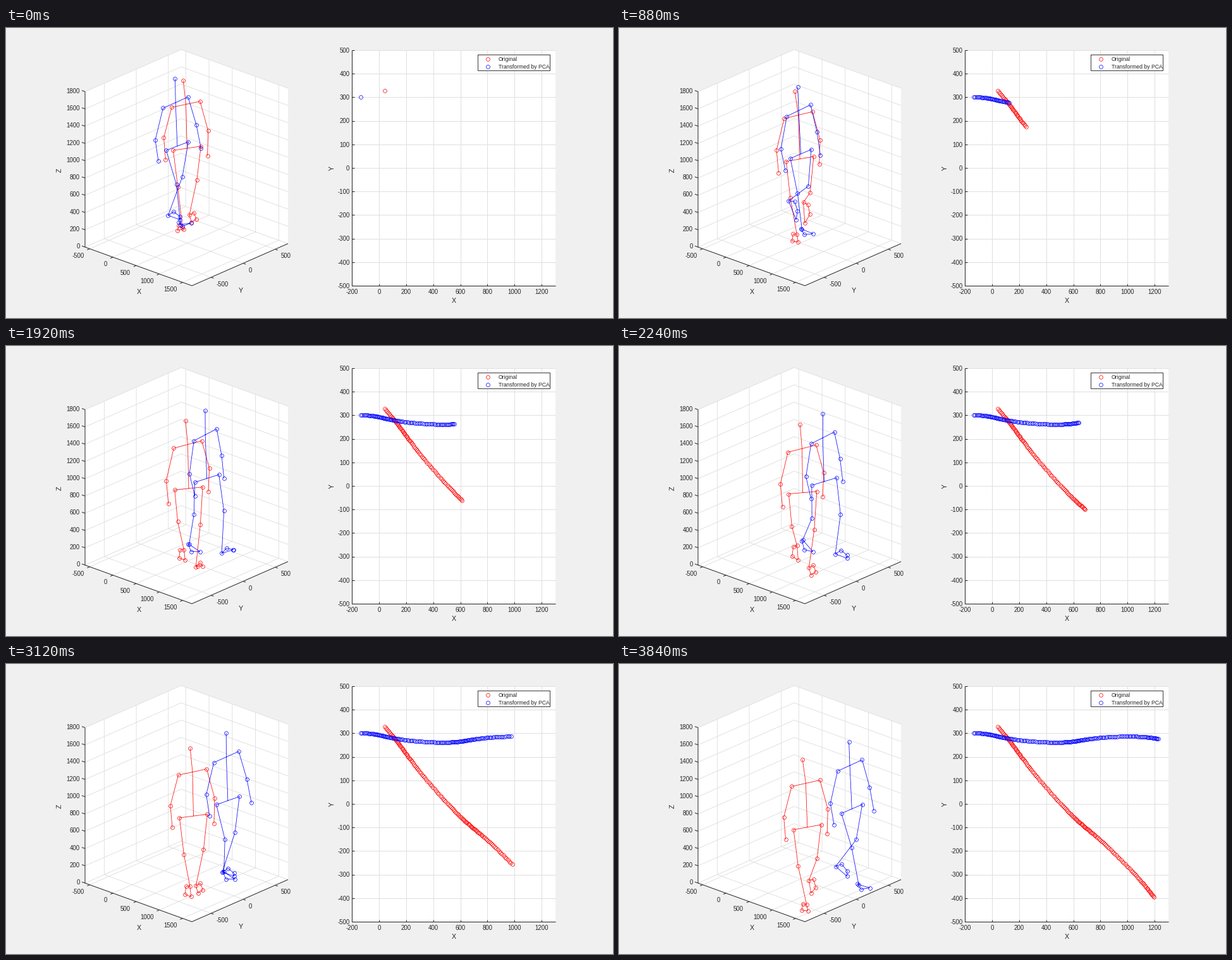
Recreate the animation shown at these times as a matplotlib script. Size 960 by 458 pixels, loop 3.92 s.

```python
import numpy as np
import matplotlib.pyplot as plt
from matplotlib.animation import FuncAnimation

W, H, DPI = 960, 458, 100
FRAMES, STEP = 49, 80
PT = 72 / DPI  # points per pixel
INK, GRID = "#262626", "#dfdfdf"
RED, BLUE = "#ff0000", "#0000ff"
RING = dict(ls="", marker="o", mfc="none", ms=5.8 * PT, mew=0.72 * PT,
            snap=False)

plt.rcParams["font.family"] = "Liberation Sans"
fig = plt.figure(figsize=(W / DPI, H / DPI), dpi=DPI, facecolor="#f0f0f0")
ax = fig.add_axes([0, 0, 1, 1])
ax.set_xlim(0, W)
ax.set_ylim(H, 0)
ax.axis("off")


def line(pts, color=INK, width=1, z=2):
    x, y = zip(*pts)
    ax.plot(x, y, color=color, lw=width * PT, zorder=z,
            solid_capstyle="butt")


def label(x, y, text, size=9.7, ha="center", **kw):
    ax.text(x, y, text, fontsize=size * PT, color=INK, ha=ha,
            va="center", **kw)


def face(pts, z=0):
    ax.fill(*zip(*pts), color="white", lw=0, zorder=z)


# Orthographic view of the 3D box
XLO, XHI, YLO, YHI, ZHI = -600, 1700, -800, 700, 1800
UX = np.array([169, 61]) / (XHI - XLO)
UY = np.array([152, -66.5]) / (YHI - YLO)
UZ = np.array([0, -245.5]) / ZHI
ORIGIN = np.array([125, 346]) - XLO * UX - YLO * UY


def project(p):
    return ORIGIN + np.asarray(p, float) @ np.array([UX, UY, UZ])


def draw_box():
    def path(*pts):
        return [project(p) for p in pts]

    face(path((XLO, YLO, 0), (XHI, YLO, 0), (XHI, YHI, 0), (XLO, YHI, 0)))
    face(path((XLO, YLO, 0), (XLO, YHI, 0), (XLO, YHI, ZHI), (XLO, YLO, ZHI)))
    face(path((XLO, YHI, 0), (XHI, YHI, 0), (XHI, YHI, ZHI), (XLO, YHI, ZHI)))

    for x in range(-500, 1501, 500):
        line(path((x, YLO, 0), (x, YHI, 0), (x, YHI, ZHI)), GRID, 0.9, 1)
        px, py = project((x, YLO, 0))
        line([(px, py), (px - 4, py + 1.7)])
        label(px - 8.7, py + 11.5, f"{x}", ha="right")
    for y in (-500, 0, 500):
        line(path((XHI, y, 0), (XLO, y, 0), (XLO, y, ZHI)), GRID, 0.9, 1)
        px, py = project((XHI, y, 0))
        line([(px, py), (px + 4, py + 1.5)])
        label(px + 8.5, py + 11, f"{y}", ha="left")
    for z in range(0, ZHI + 1, 200):
        line(path((XLO, YLO, z), (XLO, YHI, z), (XHI, YHI, z)), GRID, 0.9, 1)
        px, py = project((XLO, YLO, z))
        line([(px, py), (px - 5, py - 1.8)])
        label(px - 8.2, py - 0.8, f"{z}", ha="right")

    line(path((XLO, YLO, ZHI), (XLO, YLO, 0), (XHI, YLO, 0), (XHI, YHI, 0)))
    label(210, 417.5, "X", 10.8)
    label(371.5, 415.5, "Y", 10.8)
    label(85, 225, "Z", 10.8, rotation=90)


def plan(x, y):
    """Position in the flat X-Y plot."""
    return 590 + 0.2143 * x, 221 - 0.372 * y


def draw_plan():
    left, top = plan(-200, 500)
    right, bottom = 868.5, plan(0, -500)[1]
    face([(left, top), (right, top), (right, bottom), (left, bottom)])
    for x in range(-200, 1201, 200):
        px = plan(x, 0)[0]
        line([(px, top), (px, bottom)], GRID, 1, 1)
        line([(px, bottom), (px, bottom - 3.5)])
        label(px, 417.5, f"{x}")
    for y in range(-500, 501, 100):
        py = plan(0, y)[1]
        line([(left, py), (right, py)], GRID, 1, 1)
        line([(left, py), (left + 3.5, py)])
        label(543.5, py + 0.7, f"{y}", ha="right")
    line([(left, top), (left, bottom), (right, bottom)])
    label(708, 431.5, "X", 10.8)
    label(516, 221, "Y", 10.8, rotation=90)


def draw_legend():
    box = [(746, 42), (860, 42), (860, 67), (746, 67), (746, 42)]
    face(box, z=6)
    line(box, width=0.9, z=7)
    for y, color, text in ((49, RED, "Original"),
                           (60.5, BLUE, "Transformed by PCA")):
        ax.plot([762], [y], color=color, zorder=8, **RING)
        label(779, y + 0.8, text, 8.7, ha="left", zorder=8)


# Walking model in mm: x forward, y sideways, z up; side is -1 or +1
TURN = np.radians(31)
C, S = np.cos(TURN), np.sin(TURN)
UNTURN = np.array([[C, -S, 0], [S, C, 0], [0, 0, 1]])
STRIDE = 42  # frames for two steps
STEP_LEN = 597
FOOT = 245
TIMES = np.arange(FRAMES, dtype=float)


def vec(x, y, z):
    return np.stack(np.broadcast_arrays(x, y, z), axis=-1).astype(float)


def wave(t, peak=0, period=STRIDE):
    return np.cos(2 * np.pi * (t - peak) / period)


def smooth(u):
    u = np.clip(u, 0, 1)
    return u * u * (3 - 2 * u)


def pelvis(t):
    """Speed and height vary with each step, sideways drift with each stride."""
    return vec(-163 + 28.9 * t + 30 * wave(t, 1, STRIDE / 2),
               285.5 - 0.37 * t + 16.5 * wave(t, -1),
               884 + 24 * wave(t, 18.5, STRIDE / 2))


def arm(chest, side):
    swing = side * wave(TIMES)
    shoulder = chest + side * vec(11 + 13 * wave(TIMES), 178, 11)
    elbow = shoulder + vec(5 + 37 * swing, 98 * side, -345)
    wrist = elbow + vec(84 + 18 * side + 27 * swing, -20 * side, -243)
    return shoulder, elbow, wrist


def thigh(waist, side):
    hip = waist + side * vec(2 + 22 * wave(TIMES, 29.5), 176, -9)
    reach = 45 - 125 * side * wave(TIMES, 3)
    knee = hip + vec(reach, -45 * side, -np.sqrt(410 ** 2 - reach ** 2))
    return hip, knee


def footprint(k, side):
    return STEP_LEN * k + 204 - 10 * side, 288 + side * (56 - 10 * k)


def foot(side):
    """Stand, roll over the toes, swing forward and land on the heel."""
    since = TIMES - 4 - STRIDE / 2 * (side > 0)
    k = 2 * np.floor(since / STRIDE) + (side > 0)
    age = since % STRIDE
    u = np.clip((age - 25.5) / (STRIDE - 25.5), 0, 1)
    pitch = np.radians(np.interp(age, [0, 2.5, 17, 23.5, 28, 36, 39, STRIDE],
                                 [-18, 0, 0, 17, 50, 2, -26, -18]))
    cos, sin = np.cos(pitch), np.sin(pitch)
    x0, y0 = footprint(k, side)
    x1, y1 = footprint(k + 2, side)
    x = x0 + (x1 - x0) * smooth(u) + FOOT * (1 - cos) * (pitch > 0)
    y = y0 + (y1 - y0) * smooth(u)
    z = 30 + FOOT * np.maximum(sin, 0) + 28 * np.sin(np.pi * u)

    def part(dx, dy, dz):
        return vec(x + dx * cos + dz * sin, y + side * dy,
                   z - dx * sin + dz * cos)

    return (part(0, 0, 0), part(48, 52, 35), part(151, 76, -9),
            part(FOOT, 5, -3))


waist = pelvis(TIMES)
sway = wave(TIMES, 31.5)
chest = waist + vec(-19, -13 + 6 * sway, 505)
head = waist + vec(23, -50 + 16 * sway, 801)
gap = np.full_like(head, np.nan)

arms = [arm(chest, side) for side in (-1, 1)]
legs = [thigh(waist, side) + foot(side) for side in (-1, 1)]

joints = [head]
bones = [head, chest, waist, gap, *arms[0][::-1], *arms[1], gap]
bones += [legs[0][0], legs[1][0]]
for limb in arms + legs:
    joints += limb
for hip, knee, heel, *rest in legs:
    bones += [gap, hip, knee, heel, *rest, heel]

JOINTS = np.stack(joints, axis=1)
BONES = np.stack(bones, axis=1)
PER_FRAME = 3
TRAIL = pelvis(np.arange((FRAMES - 1) * PER_FRAME + 1) / PER_FRAME)


class Walker:
    def __init__(self, color, turn):
        self.joints = project(JOINTS @ turn)
        self.bones = project(BONES @ turn)
        self.trail = np.array(plan(*(TRAIL @ turn)[:, :2].T))
        self.sticks, = ax.plot([], [], color=color, lw=0.75 * PT, zorder=4)
        self.rings, = ax.plot([], [], color=color, zorder=4, **RING)
        self.dots, = ax.plot([], [], color=color, zorder=4, **RING)

    def show(self, n):
        self.sticks.set_data(*self.bones[n].T)
        self.rings.set_data(*self.joints[n].T)
        self.dots.set_data(*self.trail[:, :PER_FRAME * n + 1])
        return [self.sticks, self.rings, self.dots]


draw_box()
draw_plan()
draw_legend()
walkers = [Walker(RED, UNTURN), Walker(BLUE, np.eye(3))]


def update(n):
    return [artist for w in walkers for artist in w.show(n)]


anim = FuncAnimation(fig, update, frames=FRAMES, interval=STEP, repeat=True,
                     repeat_delay=0, blit=False)
plt.show()
```
